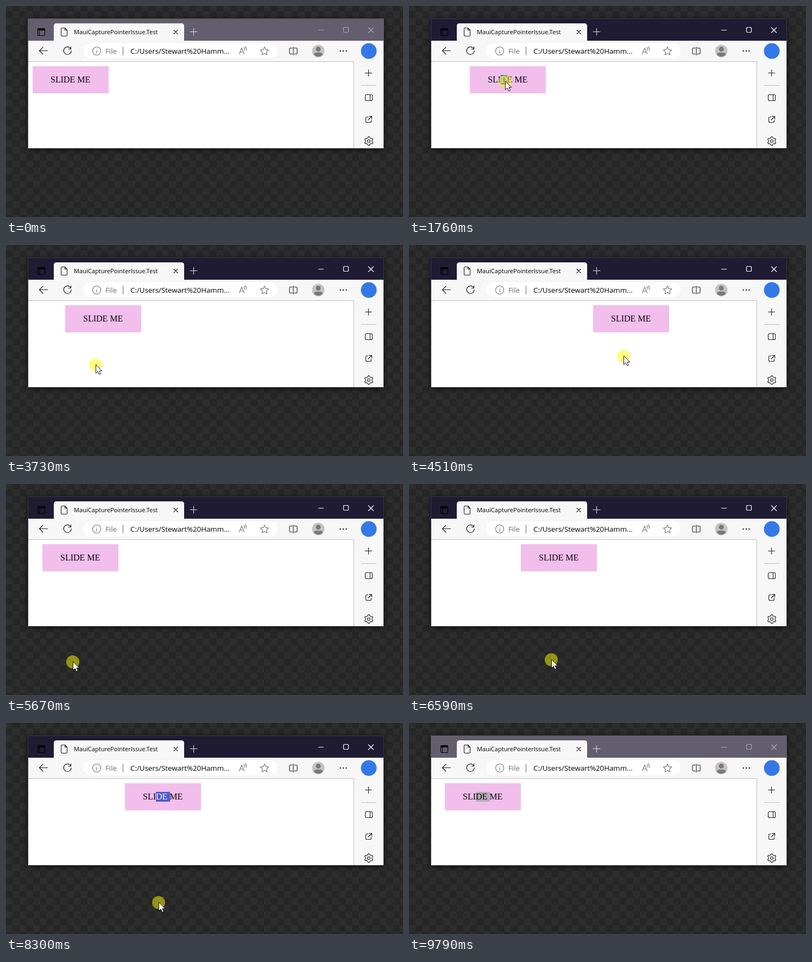
An HTML page that plays this animation: 731x389 px, repeating every 9.87 s.

```html
<!DOCTYPE html>
<html lang="en">
<head>
<meta charset="utf-8">
<title>Slide me</title>
<style>
  html, body { margin: 0; width: 100%; height: 100%; overflow: hidden; background: #262626; }
  svg { display: block; }
  text { font-family: "Open Sans", "Noto Sans", sans-serif; white-space: pre; }
  .line { fill: none; stroke: #1a1a1a; stroke-width: 1.1; stroke-linecap: round; stroke-linejoin: round; }
  .grey { stroke: #707070; }
  #shadow { filter: drop-shadow(0 2px 5px #000a); }
  #label { font: 16px "Liberation Serif", "Times New Roman", serif; }
  #bar { fill: #625e6e; }
  #caption { stroke: #aaa7b2; }
  #frame { fill: none; stroke: #5c5c5c; }
  .active #bar { fill: #1f1b33; }
  .active #caption { stroke: #fff; }
  .active #frame { stroke: #3b3848; }
  #mark { fill: #b5acb6; }
  .active #mark { fill: #4a5bd0; }
  .active .picked { fill: #fff; }
</style>
</head>
<body>
<svg id="stage" width="731" height="389" viewBox="0 0 731 389">
  <defs>
    <pattern id="checks" width="25" height="25" y="10" patternUnits="userSpaceOnUse">
      <path fill="#262626" d="M0 0h25v25h-25z"/>
      <path fill="#2d2d2d" d="M12.500 0h12.500v12.500h-12.500zM0 12.500h12.500v12.500h-12.500z"/>
    </pattern>
  </defs>
  <rect width="731" height="389" fill="url(#checks)"/>

  <!-- Window and page -->
  <rect id="shadow" x="40" y="23" width="656" height="240" fill="#fff"/>
  <rect id="bar" x="40" y="23" width="656" height="41"/>
  <g id="box">
    <rect y="111" width="140" height="50" fill="#f2beec"/>
    <rect id="mark" x="57" y="127" height="18"/>
    <text id="label" x="33" y="141">SLI<tspan id="d">D</tspan><tspan id="e">E</tspan> ME</text>
  </g>

  <!-- Toolbar, tab and side panel -->
  <path fill="#f7f7f7" d="M41 64h655v199h-55v-160h-600zM88 64v-27q0-5 5-5h230q5 0 5 5v27z"/>
  <path fill="none" stroke="#bdbdbd" d="M41 102.500h599.500v160"/>
  <rect x="140.500" y="67.500" width="361" height="30" rx="15" fill="#fff" stroke="#f0f0f0"/>

  <!-- Title bar -->
  <rect x="58.500" y="41.500" width="13" height="13" rx="2" class="line" style="stroke:#000"/>
  <path d="M58 43q0-2 2-2h10q2 0 2 2v2h-10v9h-1v-9h-3z"/>
  <path class="line" d="M101.500 42q0-1.500 1.500-1.500h5.500l4 4v9.500q0 1.500-1.500 1.500h-8q-1.500 0-1.500-1.500zM108.500 40.500v4h4M309 44.500l7 7m0-7l-7 7"/>
  <text x="125" y="52" font-size="11.1">MauiCapturePointerIssue.Test</text>
  <path class="line" style="stroke:#dddbe2" d="M339 47.500h13M345.500 41v13"/>
  <path id="caption" fill="none" stroke-width="1.200" d="M575 44.500h10M622.500 39.500h7l1 1v7l-1 1h-7l-1-1v-7zM667 39.500l10 10m0-10l-10 10"/>

  <!-- Address row -->
  <path class="line" d="M76.500 82.500h-15m6.500-6.500l-6.500 6.500 6.500 6.500M119 78.500a7 7 0 1 0 1.200 4M119.500 75v4.500h-4.500"/>
  <g class="line grey">
    <circle cx="167" cy="83" r="7.500"/>
    <path d="M167 82v5M167 79v.2M215.500 75.500v15M429.500 88.500l4.500-11 4.500 11m-1.500-3.500h-6M438 76.500q2 2 1 5M440.500 75q3 3 1.500 7"/>
    <path d="M476 75.500l2.300 4.900 5.400.7-4 3.700 1 5.300-4.700-2.600-4.700 2.600 1-5.300-4-3.700 5.400-.7z"/>
  </g>
  <g font-size="13.3">
    <text x="183" y="88" fill="#6a6a6a">File</text>
    <text x="229" y="88">C:/Users/Stewart%20Hamm...</text>
  </g>
  <path class="line" d="M527 77.500h-3.500q-1.500 0-1.500 1.500v8q0 1.500 1.500 1.500h3.500M531 77.500h3.500q1.500 0 1.500 1.500v8q0 1.500-1.500 1.500h-3.500M529 75.500v15"/>
  <circle cx="575" cy="83" r="11.500" fill="#c6c4c3"/>
  <circle cx="575" cy="79.500" r="4.500" fill="#7b7977"/>
  <path fill="#7b7977" d="M567 90q0-4 4-4h8q4 0 4 4q-8 7-16 0"/>
  <path class="line" style="stroke-width:2.400" d="M615.500 83h.01M621 83h.01M626.500 83h.01"/>
  <circle cx="668" cy="83" r="14.500" fill="#3478e8"/>

  <!-- Side panel icons -->
  <path class="line" d="M661.500 123.500h12M667.500 117.500v12M663.500 163.500h9q2 0 2 2v7q0 2-2 2h-9q-2 0-2-2v-7q0-2 2-2M670.500 163.500v11M666.500 204.500h-2q-2 0-2 2v6q0 2 2 2h6q2 0 2-2v-2M668.500 203.500h5v5M673.500 203.500l-6.500 6.500"/>
  <path stroke="#bdbdbd" d="M654 146.500h28"/>
  <path id="gear" class="line"/>
  <circle cx="668" cy="249" r="2.500" class="line"/>
  <rect id="frame" x="40.500" y="23.500" width="655" height="239"/>

  <g id="cursor">
    <circle r="12" fill="#ff0" fill-opacity=".5"/>
    <path fill="#fff" stroke="#000" stroke-width=".9" d="M.5-.5v16l3.600-3.400 2.500 5.700 2.700-1.200-2.500-5.500h5z"/>
  </g>
</svg>
<script>
const $ = id => document.getElementById(id);
const LOOP = 9870, START = 424, STEP = 76.75;
const GRAB = 13, REGRAB = 26, DROP = 84, LAST_GRAB = 86, RELEASE = 107, BLUR = 122;

// Where the pointer turns: [step, x, y]
const turns = [
  [0, 388, 378], [13, 114, 141], [15, 135, 139],
  [24.5, 536, 138], [34.4, 100, 122], [41, 104, 224],
  [49.1, 530, 204], [59, 129, 206], [66.5, 137, 326],
  [70, 102, 330], [75.4, 584, 301], [83, 98, 336],
  [86, 104, 136], [93, 634, 222], [95.7, 634, 322],
  [106, 108, 336], [111, 150, 353], [115, 245, 301]
];

function pointer(step) {
  const next = turns.findIndex(turn => turn[0] > step);
  if (next < 0) return turns.at(-1).slice(1);
  const [s0, x0, y0] = turns[next - 1], [s1, x1, y1] = turns[next];
  const ease = (1 - Math.cos(Math.PI * (step - s0) / (s1 - s0))) / 2;
  return [x0 + (x1 - x0) * ease, y0 + (y1 - y0) * ease];
}

// The box keeps the distance at which it was grabbed
function boxLeft(step, x) {
  if (step < GRAB) return 49;
  if (step < REGRAB) return x - 65;
  if (step < DROP) return x - 56;
  if (step < LAST_GRAB) return 42;
  return step < RELEASE ? x - 62 : 66;
}

function draw(now) {
  const step = Math.floor((now % LOOP - START) / STEP);
  const shown = step >= 0 && step < BLUR;
  const [x, y] = pointer(Math.max(step, 0));
  const one = step > GRAB && step < REGRAB, two = step > LAST_GRAB;

  $("stage").classList.toggle("active", step >= GRAB && step < BLUR);
  $("cursor").style.display = shown ? "" : "none";
  $("cursor").setAttribute("transform", `translate(${Math.round(x)} ${Math.round(y)})`);
  $("box").setAttribute("transform", `translate(${Math.round(boxLeft(step, x))})`);
  $("mark").setAttribute("width", two ? 26 : one ? 12 : 0);
  $("d").classList.toggle("picked", one || two);
  $("e").classList.toggle("picked", two);
  requestAnimationFrame(draw);
}

const teeth = Array.from({ length: 24 }, (_, i) => {
  const angle = (i + 1.5) * Math.PI / 12, r = i % 4 < 2 ? 8 : 6;
  return [668 + r * Math.cos(angle), 249 + r * Math.sin(angle)].map(n => n.toFixed(1));
});
$("gear").setAttribute("d", "M" + teeth.join("L") + "z");
draw(performance.now());
</script>
</body>
</html>
```
